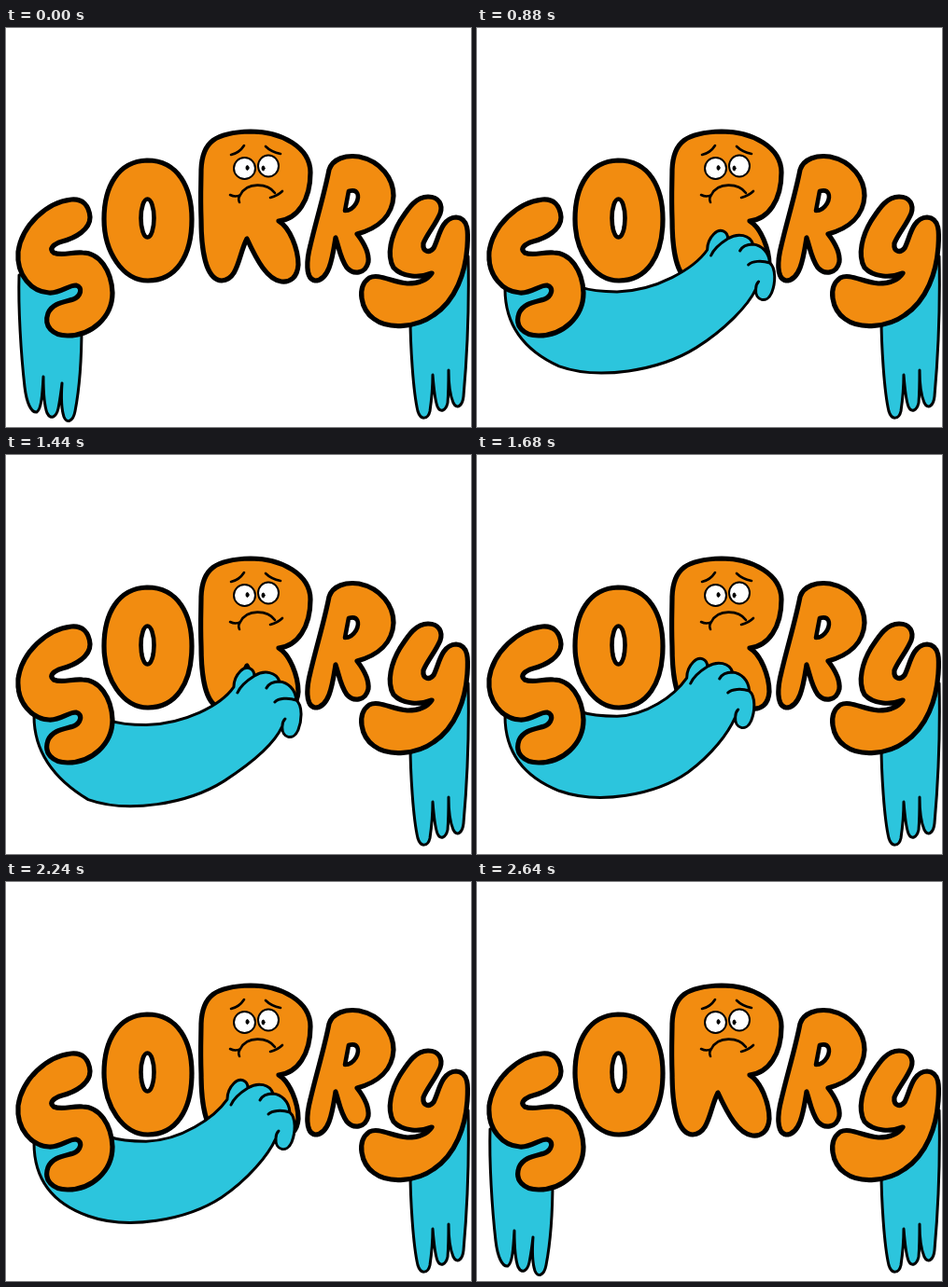
Write an HTML page that moves like this. It is 498 px wide and 428 px high and loops after 2.72 s.

```html
<!DOCTYPE html>
<html lang="en">
<head>
<meta charset="utf-8">
<title>Sorry</title>
<style>
  html, body { margin: 0; width: 100%; height: 100%; overflow: hidden; background: #fff; }
  svg { display: block; width: 498px; height: 428px; }
  path, ellipse { stroke: #000; stroke-linejoin: round; stroke-linecap: round; }
  .letter { fill: #f28c10; stroke-width: 5.2; }
  .hole { fill: #fff; stroke-width: 4.6; }
  .limb { fill: #2cc5dd; stroke-width: 3; }
  .eye { fill: #fff; stroke-width: 2; }
  .line { fill: none; stroke-width: 2.6; }
</style>
</head>
<body>
<svg viewBox="0 0 498 428">
  <path class="limb" d="M433 310C433 340 436 390 441 411C444 421 452 420 454 411C456 397 457 385 457 372C458 385 459 398 462 406C465 413 471 411 473 402C474 390 474 380 474 367C474 380 476 395 479 402C483 410 489 405 490 395C494 350 496 290 495 245Z"/>

  <!-- O -->
  <path class="letter" d="M151 142C185 142 199 172 199 205C199 245 182 271 152 271C125 271 105 240 105 205C105 170 120 143 151 142Z"/>
  <ellipse class="hole" cx="151.5" cy="204" rx="7" ry="20.5"/>

  <!-- R with the face -->
  <path class="letter" d="M209 152C210 122 224 112 262 111C295 111 326 128 326 155C326 185 312 205 292 207C304 214 313 237 313 254C312 268 304 273 295 272C280 270 269 250 258 226C249 243 249 270 231 271C213 270 209 235 209 205C208 180 209 165 209 152Z"/>
  <ellipse class="eye" cx="281" cy="148" rx="11" ry="11.5"/>
  <ellipse class="eye" cx="255.5" cy="150.5" rx="11.5" ry="11.5"/>
  <ellipse cx="258.5" cy="150" rx="1.5" ry="2.4"/>
  <ellipse cx="275.5" cy="150.500" rx="1.5" ry="2.4"/>
  <path class="line" d="M241 136Q250 134 255 126M278 127Q284 133 294 135"/>
  <path class="line" d="M250 187Q248 183 251 179C258 165 280 166 288 177M240 179Q246 182 251 179M283 182Q291 180 296 175"/>

  <!-- R -->
  <path class="letter" d="M346 152C350 140 364 136 378 138C402 143 415 162 415 180C414 202 398 215 376 221C383 230 389 242 388 251C385 264 372 265 365 257C358 247 357 237 353 225C350 243 347 271 331 271C320 269 322 248 326 233C332 207 341 178 346 152Z"/>
  <path class="hole" d="M367 175C377 172 379 180 375 188C372 193 367 196 363 196Z"/>

  <!-- Y -->
  <path class="letter" d="M452 181C464 181 468 190 465 199C460 211 451 221 447 231C446 240 453 242 458 236C464 224 466 204 482 203C496 204 495 220 494 235C492 262 482 292 458 308C440 321 410 324 394 312C380 302 375 278 389 268C399 263 412 272 430 274C444 274 452 269 456 263C444 268 425 268 415 257C407 243 413 222 422 207C430 195 438 181 452 181Z"/>

  <path class="limb" id="arm"/>

  <!-- S -->
  <path class="letter" d="M70 184C43 187 17 212 13 240C11 266 28 283 46 284C58 285 66 276 75 276C83 278 80 288 72 291C62 294 50 295 45 306C40 320 50 330 66 330C92 330 114 310 114 284C113 260 100 241 82 241C70 240 60 245 51 241C46 237 50 232 60 229C75 225 90 216 90 203C89 190 82 183 70 184Z"/>
</svg>
<script>
const LOOP = 2720, HOLD = 480, STEP = 80;
const arm = document.getElementById('arm');

const hanging = 'M14 265C13 300 16 350 20 385C22 402 27 413 33 412C38 409 39 392 40 374' +
  'C40 390 41 405 44 413C48 421 54 417 56 408C58 398 59 390 60 381' +
  'C59 395 59 408 62 417C65 425 72 422 74 411C79 385 81 355 81 320L95 270L60 260Z';

const swinging = 'M20 270C20 320 50 375 100 403C120 413 140 420 155 424C166 427 172 419 163 412' +
  'C175 416 186 414 183 405C181 401 176 399 171 397C184 398 192 391 184 385' +
  'C165 374 130 355 104 318L95 270L60 260Z';

const lifting = 'M29 280C27 312 51 361 89 387C121 411 185 414 225 396C248 386 262 374 271 363' +
  'C279 371 290 368 296 353C298 345 297 340 295 337C301 330 303 318 299 312' +
  'C301 302 296 296 287 296C283 293 282 292 281 290C277 284 264 287 256 293' +
  'C243 303 232 317 215 322C180 330 140 318 112 284L70 260Z' +
  'M262 299C270 294 280 294 287 296M277 313C285 309 293 309 299 312' +
  'M275 334C282 331 290 332 295 337M271 363C267 360 268 356 270 353';

// Arm on the chest; the hand moves by (dx, dy) and the forearm follows partly.
function resting(dx, dy) {
  const h = (x, y) => `${x + dx} ${y + dy} `;
  const f = (x, y, k) => `${x + dx * k} ${y + dy * 0.65 + dx * 0.15} `;
  return 'M30 280C30 310 42 342 ' + f(88, 367, 0) +
    'C' + f(130, 382, 0) + f(190, 372, 0.2) + f(225, 347, 0.4) +
    'C' + f(250, 328, 0.6) + h(266, 310) + h(274, 292) +
    'C' + h(273, 305) + h(286, 308) + h(291, 296) +
    'C' + h(295, 286) + h(296, 270) + h(289, 264) +
    'C' + h(288, 252) + h(280, 245) + h(271, 244) +
    'C' + h(268, 234) + h(255, 231) + h(244, 238) +
    'C' + h(244, 230) + h(236, 226) + h(229, 233) +
    'C' + h(224, 238) + h(222, 244) + h(222, 250) +
    'C' + h(208, 270) + f(180, 286, 0.5) + f(150, 287, 0) +
    'C' + f(135, 287, 0) + f(122, 286, 0) + f(110, 282, 0) + 'L70 255Z' +
    'M' + h(244, 238) + 'C' + h(236, 243) + h(229, 249) + h(226, 256) +
    'M' + h(271, 244) + 'C' + h(264, 244) + h(259, 247) + h(257, 251) +
    'M' + h(289, 264) + 'C' + h(280, 261) + h(270, 262) + h(266, 266) +
    'M' + h(274, 292) + 'C' + h(274, 288) + h(275, 286) + h(277, 284);
}

// One turn of the rubbing hand takes six steps.
function rubbing(step) {
  const a = (step - 8) / 6 * 2 * Math.PI, c = Math.cos(a), s = Math.sin(a);
  return resting(12.3 - 12.3 * c - 4 * s, -6 + 6 * c - 9.2 * s);
}

function armPath(step) {
  if (step <= 0 || step >= 27) return hanging;
  if (step === 1 || step === 26) return swinging;
  if (step === 2 || step === 25) return lifting;
  if (step === 3 || step === 24) return resting(18, 28);
  return rubbing(step);
}

const start = performance.now();
let shown = null;
function draw(now) {
  const t = Math.max(0, now - start) % LOOP;
  const step = Math.floor((t - HOLD) / STEP);
  if (step !== shown) {
    shown = step;
    arm.setAttribute('d', armPath(step));
    arm.setAttribute('transform', step === 0 ? 'translate(-57 0) skewX(12)' : '');
  }
  requestAnimationFrame(draw);
}
draw(start);
</script>
</body>
</html>
```
